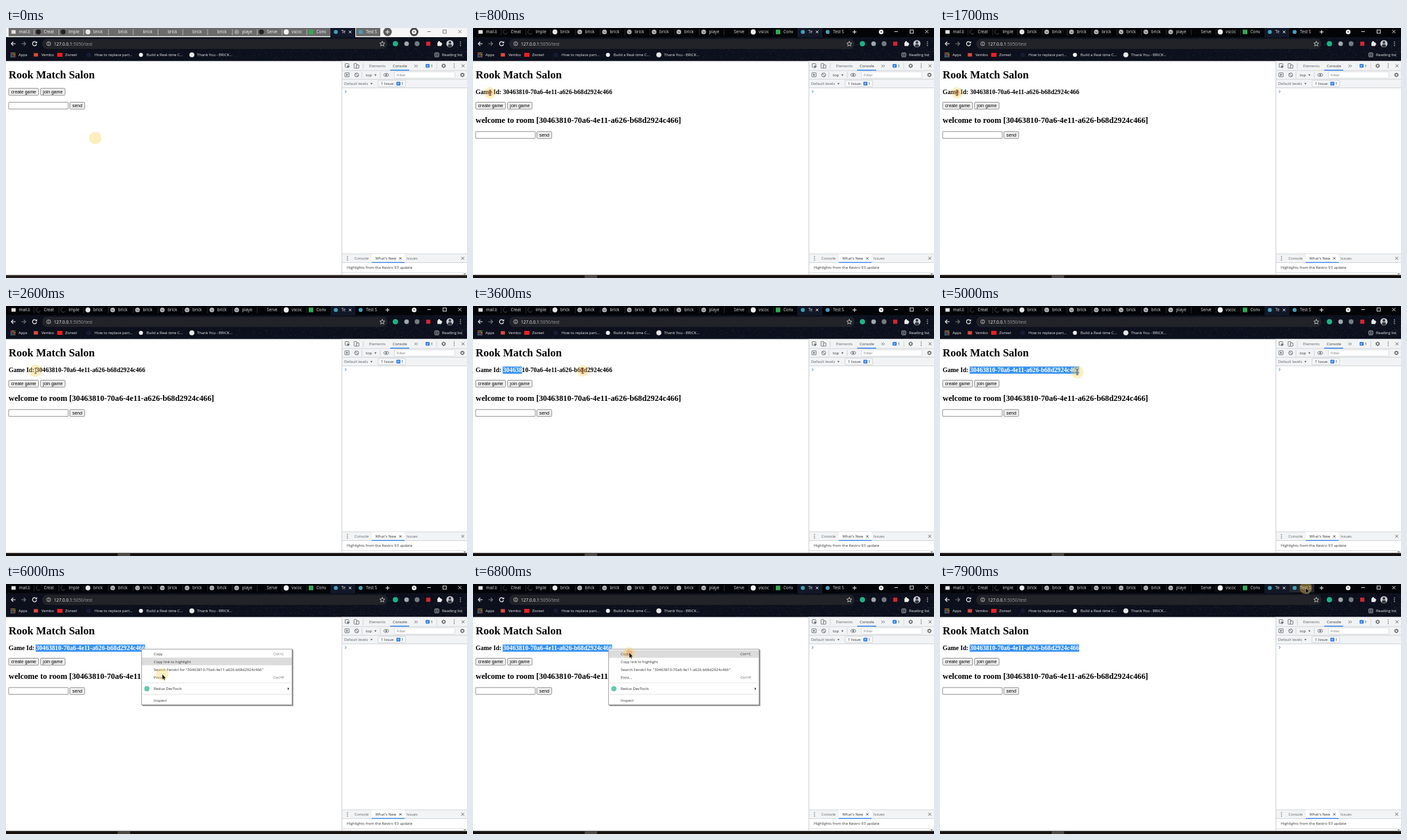
Animation, 702 px wide and 382 px high, one loop 8000 ms. Source, as an HTML page with a canvas:

```html
<!DOCTYPE html>
<html lang="en">
<head>
<meta charset="utf-8">
<title>Rook Match Salon</title>
<style>
html, body { margin: 0; width: 100%; height: 100%; overflow: hidden; background: #fff; }
canvas { display: block; }
</style>
</head>
<body>
<canvas id="stage" width="702" height="382"></canvas>
<script>
const ctx = document.getElementById('stage').getContext('2d');
const LOOP = 8000, STEP = 100;
const UI = '"Open Sans", "Noto Sans", sans-serif';
const SERIF = '"Liberation Serif", "Times New Roman", serif';
const ARIAL = '"Liberation Sans", Arial, sans-serif';
const ID = '30463810-70a6-4e11-a626-b68d2924c466';
const TOP = 50.5, BOTTOM = 377.5;

// When things happen, in ms
const FOCUS = 700, CREATED = 800, MENU_ON = 5700, HOVER_COPY = 6500, MENU_OFF = 7000;

// time, x, y of the pointer
const PATH = [
  [0, 136, 168], [300, 136, 168], [700, 26, 99], [1800, 26, 99], [2400, 44, 99],
  [2800, 46, 99], [3600, 167, 99], [4300, 206, 100], [5000, 209, 101], [5600, 208, 99],
  [6000, 238, 138], [6200, 238, 138], [6500, 238, 105], [6900, 238, 105], [7500, 557, 6]
];
// time, number of selected characters
const SELECTION = [[2900, 0], [3600, 6], [3700, 24], [4300, 34], [4700, 36]];
const PRESSES = [[600, 800], [1600, 1800], [2800, 4700], [5500, 5700], [6700, 6900]];

function along(keys, t, i) {
  if (t <= keys[0][0]) return keys[0][i];
  for (let k = 1; k < keys.length; k++) {
    const a = keys[k - 1], b = keys[k];
    if (t <= b[0]) return a[i] + (b[i] - a[i]) * (t - a[0]) / (b[0] - a[0]);
  }
  return keys[keys.length - 1][i];
}

function rect(x, y, w, h, color) {
  ctx.fillStyle = color;
  ctx.fillRect(x, y, w, h);
}

function box(x, y, w, h, r, fill, edge) {
  ctx.beginPath();
  ctx.roundRect(x, y, w, h, r);
  if (fill) { ctx.fillStyle = fill; ctx.fill(); }
  if (edge) { ctx.strokeStyle = edge; ctx.lineWidth = 0.8; ctx.stroke(); }
}

function disc(x, y, r, color) {
  ctx.beginPath();
  ctx.arc(x, y, r, 0, 7);
  ctx.fillStyle = color;
  ctx.fill();
}

function ring(x, y, r, color, w = 0.9, from = 0, to = 6.3) {
  ctx.beginPath();
  ctx.arc(x, y, r, from, to);
  ctx.strokeStyle = color;
  ctx.lineWidth = w;
  ctx.stroke();
}

function line(color, w, ...p) {
  ctx.beginPath();
  ctx.moveTo(p[0], p[1]);
  for (let i = 2; i < p.length; i += 2) ctx.lineTo(p[i], p[i + 1]);
  ctx.strokeStyle = color;
  ctx.lineWidth = w;
  ctx.stroke();
}

function shape(color, ...p) {
  ctx.beginPath();
  for (let i = 0; i < p.length; i += 2) ctx.lineTo(p[i], p[i + 1]);
  ctx.closePath();
  ctx.fillStyle = color;
  ctx.fill();
}

function text(s, x, y, color, font = '5.8px ' + UI, align = 'left') {
  ctx.font = font;
  ctx.fillStyle = color;
  ctx.textAlign = align;
  ctx.fillText(s, x, y);
  return ctx.measureText(s).width;
}

function cross(x, y, r, color) {
  line(color, 0.9, x - r, y - r, x + r, y + r);
  line(color, 0.9, x + r, y - r, x - r, y + r);
}

function dots(x, y, color) {
  for (const d of [-2.7, 0, 2.7]) disc(x, y + d, 0.75, color);
}

function gear(x, y) {
  ring(x, y, 2.1, '#555', 1.1);
  for (let a = 0; a < 6.2; a += Math.PI / 4) {
    const c = Math.cos(a), s = Math.sin(a);
    line('#555', 1, x + 2.4 * c, y + 2.4 * s, x + 3.4 * c, y + 3.4 * s);
  }
}

function caret(x, y) {
  shape('#5f6368', x - 1.6, y - 1.2, x + 1.6, y - 1.2, x, y + 1.4);
}

// Grain of the browser theme, denser to the right
function grain() {
  let seed = 11;
  const rnd = () => (seed = seed * 16807 % 2147483647) / 2147483647;
  for (let i = 0; i < 1800; i++) {
    const x = 702 * Math.sqrt(rnd()), y = 14 + 37 * rnd();
    rect(x, y, 1, 1, `rgba(95,112,155,${0.05 + 0.22 * rnd()})`);
  }
}

function tabs(active, hover) {
  const ink = active ? '#e2e2e2' : '#fafafa';
  rect(0, 0, 702, 14, active ? '#030407' : '#f6f6f6');
  if (!active) {
    rect(4, 0, 490, 12.6, '#6b6b6b');
    rect(533, 0, 37, 12.6, '#6b6b6b');
  }
  rect(494, 0, 38, 14, '#121828');
  if (hover) rect(532, 0, 38, 13, '#23262d');
  const names = ['mail.bo', 'Creat', 'Imple', 'brick', 'brick', 'brick', 'brick', 'brick', 'brick',
    'playe', 'Serve', 'vscoc', 'Conv', 'Te', 'Test S'];
  names.forEach((name, i) => {
    const x = 11.5 + 37.75 * i;
    if (i && i < 13) line(active ? '#34363b' : '#c4c4c4', 0.8, x - 6.5, 2, x - 6.5, 11);
    ctx.save();
    ctx.beginPath();
    ctx.rect(x + 7, 0, 18, 13);
    ctx.clip();
    text(name, x + 8.3, 8.3, ink, '6.2px ' + UI);
    ctx.restore();
    tabIcon(i, x, active);
  });
  cross(524, 6, 2, '#eee');

  if (!active) disc(581, 6, 6.5, '#5c5c5c');
  line('#fff', 1, 578, 6, 584, 6);
  line('#fff', 1, 581, 3, 581, 9);
  if (!active) disc(621.5, 6, 6.5, '#4a4a4a');
  disc(621.5, 6, 3.5, '#fff');
  shape('#333', 619.8, 5.2, 623.2, 5.2, 621.5, 7.3);
  const win = active ? '#eee' : '#777';
  line(win, 0.9, 641.5, 5.5, 647, 5.5);
  ctx.strokeStyle = win;
  ctx.strokeRect(665.5, 3, 5, 5);
  cross(691, 5.5, 2.5, win);
}

function tabIcon(i, x, active) {
  const y = 6;
  if (i === 0) rect(x - 3.2, y - 2.7, 6.4, 5.4, '#e4e4e4');
  else if (i < 3) active ? ring(x, y, 3.5, '#4b4e55', 0.9, 0.5, 4.5) : disc(x, y, 3.7, '#222');
  else if (i === 3) disc(x, y, 3.7, '#e8e8e8');
  else if (i < 10) {
    if (active) { disc(x, y, 3.6, '#b4b7bb'); line('#50545a', 1, x - 2, y - 1, x, y + 1, x + 2, y); }
    else if (i === 9) disc(x, y, 3.6, '#999');
  }
  else if (i === 10) { if (!active) disc(x, y, 3.7, '#222'); }
  else if (i === 11) disc(x, y, 3.9, '#f2f2f2');
  else if (i === 12) rect(x - 3.5, y - 3.5, 7, 7, '#35a853');
  else disc(x, y, 3.1, '#3f9fb8');
}

function toolbar() {
  box(55, 16.5, 526, 15.5, 7.7, '#212328');
  line('#eee', 1.1, 14.5, 24, 8, 24);
  line('#eee', 1.1, 11, 21, 8, 24, 11, 27);
  line('#777', 1.1, 23.5, 24, 30, 24);
  line('#777', 1.1, 27, 21, 30, 24, 27, 27);
  ring(43.5, 24, 3.1, '#eee', 1.2, 0.2, 5.4);
  shape('#eee', 44.2, 23.2, 47.3, 23.2, 47.3, 20);
  ring(65, 24, 3, '#ccc', 0.8);
  line('#ccc', 0.9, 65, 23.5, 65, 25.8);
  rect(64.5, 22, 1, 0.9, '#ccc');
  const w = text('127.0.0.1', 73, 26.5, '#f0f0f0', '6.6px ' + UI);
  text(':5050/test', 73 + w, 26.5, '#9a9da2', '6.6px ' + UI);
  const star = [];
  for (let i = 0; i < 11; i++) {
    const a = -Math.PI / 2 + i * Math.PI / 5, r = i % 2 ? 1.8 : 4;
    star.push(573 + r * Math.cos(a), 24.3 + r * Math.sin(a));
  }
  line('#ddd', 0.8, ...star);
  disc(593, 24, 4, '#19b584');
  disc(610, 24, 3.5, '#a4a8ae');
  disc(626, 24, 3.7, '#777b82');
  rect(639.8, 20.8, 6.4, 6.4, '#d32630');
  rect(657, 22, 6, 5.5, '#eee');
  disc(659.5, 21.5, 1.4, '#eee');
  disc(663, 24.5, 1.3, '#eee');
  // profile silhouette
  disc(676, 24, 5.5, '#c9ccd2');
  disc(676, 22, 2, '#34373d');
  shape('#34373d', 672.5, 28, 674, 24.7, 678, 24.7, 679.5, 28, 676, 29.4);
  dots(692, 24, '#eee');
}

function bookmarks() {
  const hues = ['#e65a4d', '#f0b429', '#4caf6a', '#5596ee'];
  for (let i = 0; i < 9; i++) rect(7 + i % 3 * 2.7, 37.5 + Math.floor(i / 3) * 2.7, 1.8, 1.8, hues[i % 4]);
  const put = (s, x) => text(s, x, 43.2, '#f0f0f0');
  put('Apps', 19);
  rect(42.3, 38.4, 6.4, 5.2, '#e04a3f');
  put('Vembo', 54);
  rect(78, 38, 8, 6, '#f01f1f');
  put('Zivreel', 90);
  disc(126, 41, 3.5, '#171c35');
  put('How to replace part...', 135);
  disc(205.5, 41, 3.1, '#f2f2f2');
  put('Build a Real-time C...', 214);
  disc(283, 41, 3.8, '#e8e8e8');
  put('Thank You - BRICK...', 291);
  box(653, 38, 6, 6, 0.8, null, '#ddd');
  line('#ddd', 0.8, 654.5, 40, 657.5, 40);
  line('#ddd', 0.8, 654.5, 42, 657.5, 42);
  put('Reading list', 664);
}

function button(label, x, y, w) {
  box(x, y, w, 10.6, 1.4, '#efefef', '#767676');
  text(label, x + w / 2, y + 7.6, '#000', '6.9px ' + ARIAL, 'center');
}

function page(created, picked) {
  rect(0, TOP, 511, BOTTOM - TOP, '#fff');
  text('Rook Match Salon', 4, 77, '#000', 'bold 16.5px ' + SERIF);
  const top = created ? 113.4 : 92.2, row = created ? 158.2 : 113.4;
  if (created) {
    const font = 'bold 9.64px ' + SERIF;
    const x = 4 + text('Game Id: ', 4, 101, '#000', font);
    const head = ID.slice(0, picked);
    const w = ctx.measureText(head).width;
    if (picked) rect(x - 0.5, 92.5, w + 0.5, 11, '#3390f5');
    text(head, x, 101, '#fff', font);
    text(ID.slice(picked), x + w, 101, '#000', font);
    text(`welcome to room [${ID}]`, 4, 145, '#000', 'bold 12.3px ' + SERIF);
  }
  button('create game', 4, top, 45.6);
  button('join game', 52.6, top, 37.4);
  box(4, row, 90.8, 10.4, 0.8, '#fff', '#767676');
  button('send', 97.2, row, 22.6);
}

function issueMark(x, y) {
  box(x - 3, y - 3, 6, 5.6, 1, '#1a73e8');
  line('#fff', 0.7, x - 1.7, y - 1, x + 1.7, y - 1);
  line('#fff', 0.7, x - 1.7, y + 0.7, x + 1, y + 0.7);
}

function devtools() {
  const dim = '#5f6368', ink = '#333', rule = '#cbcdd1';
  rect(511, TOP, 191, BOTTOM - TOP, '#fff');
  rect(511, TOP, 191, 91.5 - TOP, '#f1f3f4');
  for (const y of [65, 78.3, 91.5]) line(rule, 0.8, 511, y, 702, y);
  box(516.5, 54.5, 5.5, 5.5, 0.5, null, dim);
  shape(dim, 519, 57, 524, 59, 521.6, 59.7, 521, 62);
  box(530, 54.3, 4.2, 7, 0.5, null, dim);
  box(533.5, 56.5, 4, 4.8, 0.5, '#f1f3f4', dim);
  line(rule, 0.8, 544, 53.5, 544, 63);
  text('Elements', 553, 60, dim);
  text('Console', 589, 60, ink);
  rect(585, 63.8, 29, 1.3, '#1a73e8');
  for (const x of [622, 624.7]) line(dim, 0.8, x, 56, x + 2, 58, x, 60);
  issueMark(642, 58);
  text('1', 647, 60, ink);
  line(rule, 0.8, 656, 53.5, 656, 63);
  gear(666.5, 57.8);
  dots(682.5, 57.8, dim);
  cross(696, 57.8, 2.2, dim);

  box(516, 68.5, 6.5, 6, 0.5, null, dim);
  shape(dim, 518.2, 69.8, 518.2, 73.4, 521.2, 71.6);
  ring(534, 71.7, 3, dim);
  line(dim, 0.9, 532, 69.6, 536, 73.8);
  line(rule, 0.8, 542, 67, 542, 76.5);
  text('top', 548, 73.8, ink);
  caret(562.5, 72);
  line(rule, 0.8, 570, 67, 570, 76.5);
  ctx.beginPath();
  ctx.ellipse(579, 71.7, 3.8, 2.4, 0, 0, 7);
  ctx.strokeStyle = dim;
  ctx.stroke();
  disc(579, 71.7, 1.3, dim);
  box(591.5, 67, 92, 9.6, 0.8, '#fff', '#d5d7da');
  text('Filter', 595, 73.9, '#777');
  gear(695, 71.7);

  text('Default levels', 515, 87, dim);
  caret(556.5, 85.2);
  box(566.5, 80, 42, 9.8, 1.2, '#f6f7f8', rule);
  text('1 Issue:', 571, 87, ink);
  issueMark(597.5, 85.2);
  text('1', 602, 87, ink);
  line('#367cf1', 0.9, 516, 95.2, 518.2, 97.2, 516, 99.2);

  rect(511, 345, 191, 13.5, '#f1f3f4');
  line(rule, 0.8, 511, 345, 702, 345);
  line(rule, 0.8, 511, 358.5, 702, 358.5);
  dots(520, 352, dim);
  text('Console', 530.5, 354, dim);
  rect(557, 345.5, 50, 13, '#fff');
  text("What's New", 562.5, 354, ink);
  cross(600.5, 352, 1.6, ink);
  rect(557, 357.6, 50, 1.2, '#1a73e8');
  text('Issues', 610, 354, dim);
  cross(695.5, 351.8, 2.2, dim);
  text('Highlights from the Kestro 93 update', 519, 368, ink);
  line('#dadce0', 0.8, 511, 373.5, 695, 373.5);
  rect(695, 373, 7, 4.5, '#eee');
  shape('#666', 697, 375, 700, 375, 698.5, 377);
  line('#cdcfd3', 1, 511.5, TOP, 511.5, BOTTOM);
}

function menu(copyHover) {
  const ink = '#333';
  rect(208, 101, 230, 86, 'rgba(0,0,0,.2)');
  rect(207, 100, 230, 86, 'rgba(0,0,0,.36)');
  rect(206, 99, 230, 86, '#a8a8a8');
  rect(207, 100, 228, 84, '#fff');
  rect(207, copyHover ? 101 : 112.5, 228, 11.7, '#dcdcdc');
  text('Copy', 225, 109, ink);
  text('Ctrl+C', 423.5, 109, copyHover ? ink : '#777', undefined, 'right');
  text('Copy link to highlight', 225, 120.8, ink);
  text(`Search Fendol for "${ID}"`, 225, 132.6, ink);
  text('Print...', 225, 144.5, ink);
  text('Ctrl+P', 423.5, 144.5, '#666', undefined, 'right');
  line('#dedede', 0.8, 208, 151, 434, 151);
  disc(214.5, 160, 4, '#63c9ad');
  text('Redux DevTools', 225, 162, ink);
  shape(ink, 429, 158, 429, 162, 431.3, 160);
  line('#dedede', 0.8, 208, 168.3, 434, 168.3);
  text('Inspect', 225, 179.7, ink);
}

function pointer(t) {
  const x = along(PATH, t, 1), y = along(PATH, t, 2);
  const pressed = PRESSES.some(p => t >= p[0] && t <= p[1]);
  disc(x, y, pressed ? 8.8 : 9.5, 'rgba(252,205,75,.35)');
  if (pressed) disc(x, y, 4.5, 'rgba(238,95,55,.28)');
  if (t < 200) return;
  const beam = t >= CREATED && t < MENU_ON;
  if (beam) {
    line('#333', 0.8, x, y - 4, x, y + 4);
    line('#333', 0.8, x - 1.7, y - 4, x + 1.7, y - 4);
    line('#333', 0.8, x - 1.7, y + 4, x + 1.7, y + 4);
    return;
  }
  const arrow = [0, 0, 0, 8, 1.8, 6.4, 3.1, 9.2, 4.3, 8.6, 3.1, 5.9, 5.5, 5.7];
  const p = arrow.map((v, i) => v + (i % 2 ? y : x));
  shape('#000', ...p);
  line('rgba(255,255,255,.75)', 0.5, ...p, x, y);
}

function draw(t) {
  const active = t >= FOCUS;
  rect(0, 14, 702, 37, '#0c101c');
  grain();
  tabs(active, t >= 7500);
  toolbar();
  bookmarks();
  page(t >= CREATED, Math.floor(along(SELECTION, t, 1)));
  devtools();
  rect(0, BOTTOM, 702, 382 - BOTTOM, active ? '#14110f' : '#241f1d');
  if (active) rect(170, 378, 19, 4, '#4a4744');
  if (t >= MENU_ON && t < MENU_OFF) menu(t >= HOVER_COPY);
  pointer(t);
}

let start;
function tick(now) {
  start ??= now;
  draw(Math.floor((now - start) % LOOP / STEP) * STEP);
  requestAnimationFrame(tick);
}
requestAnimationFrame(tick);
</script>
</body>
</html>
```
